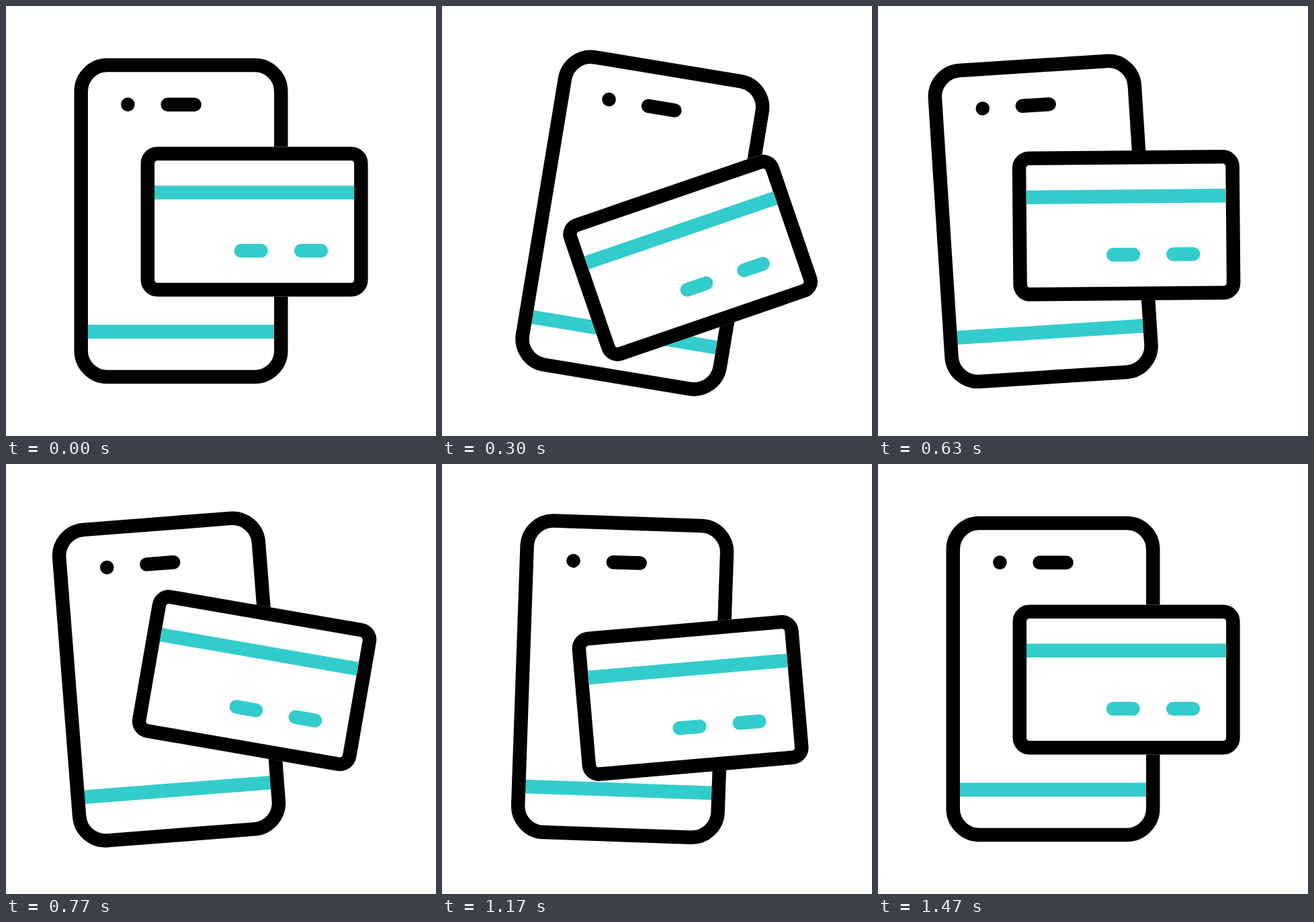
Write an HTML page that moves like this. It is 640 px wide and 640 px high and loops after 2000 ms.

```html
<!DOCTYPE html>
<html lang="en">
<head>
<meta charset="utf-8">
<title>Phone and card</title>
<style>
  html, body { margin: 0; width: 100%; height: 100%; overflow: hidden; background: #fff; }
  svg { display: block; width: 100%; height: 100%; }
  .frame { fill: #fff; stroke: #000; stroke-width: 20.5; }
  .accent { fill: #33cccc; }
</style>
</head>
<body>
<svg viewBox="0 0 640 640">
  <g id="phone">
    <rect x="121" y="474.5" width="279" height="20.5" class="accent"/>
    <rect x="111.7" y="88" width="297.6" height="463.9" rx="39" class="frame" style="fill:none"/>
    <circle cx="181.4" cy="146.6" r="10.3"/>
    <rect x="230.4" y="136.4" width="60.4" height="20.5" rx="10.25"/>
  </g>
  <g id="card">
    <rect x="200.6" y="209.5" width="338" height="222.9" rx="24.8" fill="#fff"/>
    <rect x="210.8" y="219.8" width="317.6" height="202.4" rx="14.5" class="frame"/>
    <rect x="221" y="267.4" width="297.2" height="20.5" class="accent"/>
    <rect x="339.6" y="354" width="50.3" height="20.5" rx="10.25" class="accent"/>
    <rect x="428.9" y="354" width="50.3" height="20.5" rx="10.25" class="accent"/>
  </g>
</svg>
<script>
  const LOOP = 2000, FPS = 30;
  const phone = document.getElementById('phone');
  const card = document.getElementById('card');

  // Each track lists [step, value] at 30 steps per second.
  const tilt = [[0, 0], [10.1, 9.7], [20.9, -4.85], [35, 2], [44, 0]];
  const spin = [[0, 0], [11.76, -22], [23.5, 10], [35.3, -4.95], [44, 0]];
  const drop = [[0, 0], [10.15, 56], [21.2, 0], [35.3, 27.4], [44, 0]];

  function sample(track, step) {
    const next = track.findIndex(key => key[0] > step);
    if (next < 0) return track[track.length - 1][1];
    const [t0, v0] = track[next - 1];
    const [t1, v1] = track[next];
    const p = (step - t0) / (t1 - t0);
    return v0 + (v1 - v0) * p * p * (3 - 2 * p);
  }

  function draw(now) {
    const step = Math.floor((now % LOOP + 3.4) * FPS / 1000) % (LOOP * FPS / 1000);
    phone.setAttribute('transform', `rotate(${sample(tilt, step)} 260.5 552)`);
    card.setAttribute('transform',
      `translate(0 ${sample(drop, step)}) rotate(${sample(spin, step)} 369.6 321)`);
  }

  const start = performance.now();
  function tick() {
    draw(performance.now() - start);
    requestAnimationFrame(tick);
  }
  tick();
</script>
</body>
</html>
```
